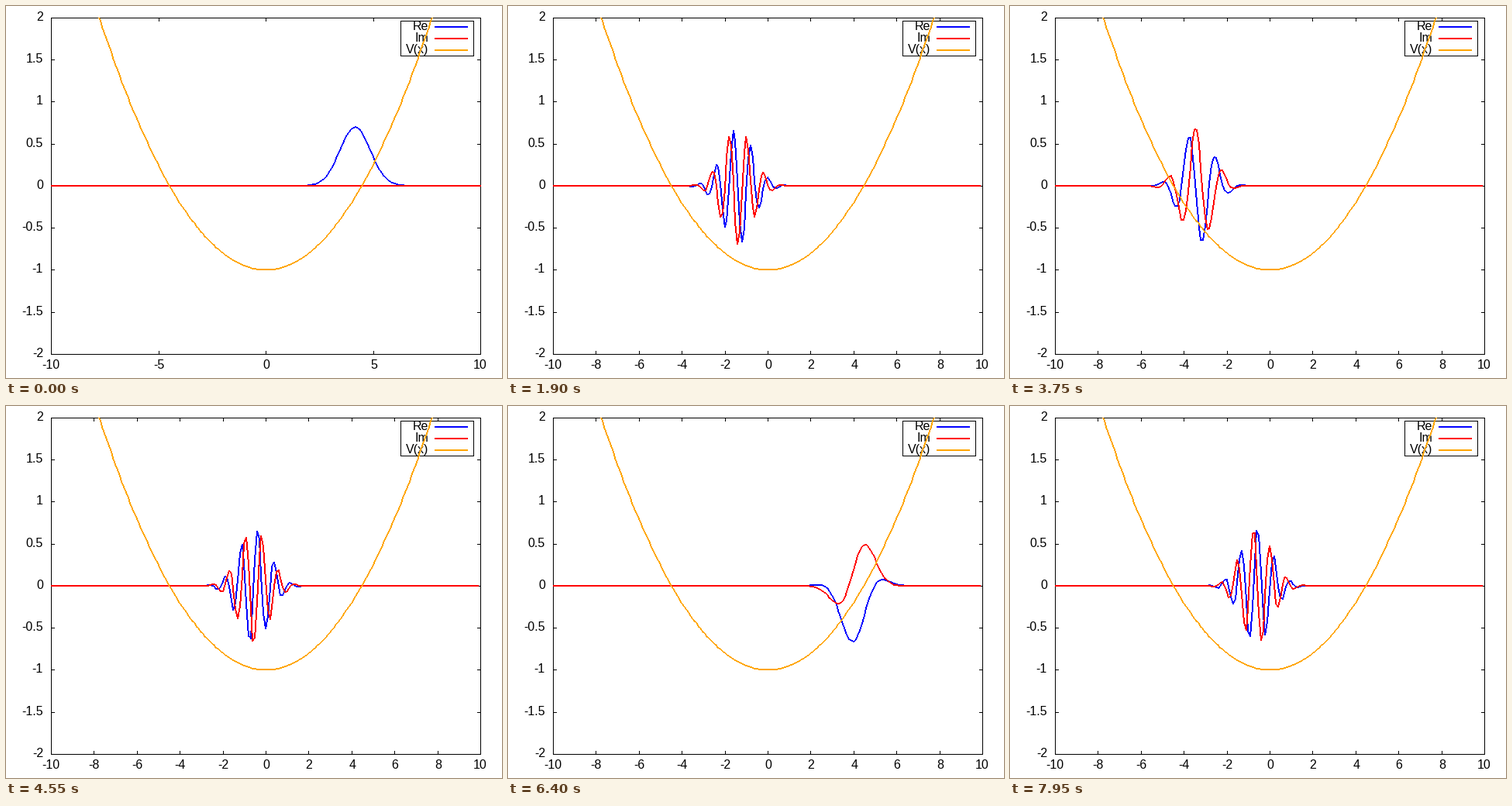
Write a matplotlib script that moves like this. It is 640 by 480 pixels and loops after 8000 ms.

```python
import matplotlib.pyplot as plt
import numpy as np
from matplotlib.animation import FuncAnimation

W, H, DPI = 640, 480, 100
LEFT, RIGHT, TOP, BOTTOM = 58, 612, 15, 449
PX = 72 / DPI                      # one pixel in points
FRAMES, INTERVAL = 160, 50
BLUE, RED, ORANGE = (0, 0, 255, 255), (255, 0, 0, 255), (255, 165, 0, 255)

# Coherent state in V(x) = x^2/20 - 1, with hbar = 1 and one time unit per frame
MASS = 4 * np.pi ** 2
OMEGA = np.sqrt(0.1 / MASS)
ALPHA = MASS * OMEGA
X0, AMP, V0 = 25 / 6, 0.697, -1.0

plt.rcParams["font.family"] = "Liberation Sans"

fig = plt.figure(figsize=(W / DPI, H / DPI), dpi=DPI, facecolor="white")
ax = fig.add_axes([0, 0, 1, 1])
ax.axis("off")


def to_px(x):
    return np.floor(335.5 + 27.7 * np.asarray(x)).astype(int)


def to_py(y):
    return 232 - np.floor(108.5 * np.asarray(y) + 0.5).astype(int)


def thin(xs, ys):
    """One-pixel black line through pixel centres."""
    return ax.plot(np.add(xs, 0.5), np.add(ys, 0.5), color="black", lw=PX,
                   antialiased=False, snap=False, zorder=1,
                   solid_capstyle="projecting", solid_joinstyle="miter")[0]


def frame_box(x0, y0, x1, y1):
    thin([x0, x1, x1, x0, x0], [y0, y0, y1, y1, y0])


def label(x, y, text, ha):
    return ax.text(x, y, text, ha=ha, va="baseline", fontsize=16 * PX,
                   color="black", zorder=2)


def x_ticks(step):
    """Bottom and top ticks with labels; returns the artists."""
    parts = []
    for v in range(-10, 11, step):
        p, text = to_px(v), str(v)
        parts.append(thin([p, p], [BOTTOM, BOTTOM - 4]))
        parts.append(thin([p, p], [TOP, TOP + 4]))
        parts.append(label(p + (len(text) == 1), 468, text, "center"))
    return parts


def stroke(img, xs, ys, color):
    """Crisp polyline, two pixels wide across its main direction."""
    pts = list(zip(xs, ys))
    for a, b in zip(pts, pts[1:]):
        steep = abs(b[1] - a[1]) > abs(b[0] - a[0])
        if a[steep] > b[steep]:
            a, b = b, a
        dx, dy = b[0] - a[0], b[1] - a[1]
        n = max(abs(dx), abs(dy))
        if n == 0:
            continue
        t = np.arange(n + 1) / n
        px = a[0] + np.sign(dx) * np.floor(abs(dx) * t + 0.5).astype(int)
        py = a[1] + np.sign(dy) * np.floor(abs(dy) * t + 0.5).astype(int)
        img[py, px] = color
        if steep:
            img[py, px - 1] = color
        else:
            img[py - 1, px] = color


def psi(x, n):
    th = OMEGA * n
    xc, pc = X0 * np.cos(th), -ALPHA * X0 * np.sin(th)
    phase = pc * (x - xc / 2) - th / 2 - V0 * n
    return AMP * np.exp(-ALPHA / 2 * (x - xc) ** 2 + 1j * phase)


# Axes
frame_box(LEFT, TOP, RIGHT, BOTTOM)
for v in np.arange(-2, 2.1, 0.5):
    p = to_py(v)
    thin([LEFT, LEFT + 4], [p, p])
    thin([RIGHT, RIGHT - 4], [p, p])
    label(48, p + 4, f"{v:g}", "right")
coarse, fine = x_ticks(5), x_ticks(2)

# Key and potential, kept as a fixed layer
still = np.zeros((H, W, 4), np.uint8)
frame_box(509, 19, 603, 64)
for i, (name, color) in enumerate((("Re", BLUE), ("Im", RED),
                                   ("V(x)", ORANGE))):
    y = 27 + 15 * i
    label(545, y + 4, name, "right")
    stroke(still, [553, 595], [y, y], color)

grid = np.linspace(-10, 10, 201)
edge = np.sqrt(60)
xv = np.unique(np.clip(grid, -edge, edge))
stroke(still, to_px(xv), to_py(xv ** 2 / 20 - 1), ORANGE)
solid = still[..., 3] > 0

layer = ax.imshow(still, extent=(0, W, H, 0), aspect="auto",
                  interpolation="none", zorder=3)
ax.set_xlim(0, W)
ax.set_ylim(H, 0)


def update(n):
    x = grid if n == 0 else grid[:-1]
    wave, px = psi(x, n), to_px(x)
    img = np.zeros_like(still)
    stroke(img, px, to_py(wave.real), BLUE)
    stroke(img, px, to_py(wave.imag), RED)
    img[solid] = still[solid]
    layer.set_data(img)
    for part in coarse:
        part.set_visible(n == 0)
    for part in fine:
        part.set_visible(n > 0)
    return [layer, *coarse, *fine]


anim = FuncAnimation(fig, update, frames=FRAMES, interval=INTERVAL,
                     init_func=lambda: update(0), repeat=True,
                     repeat_delay=0, blit=False)
plt.show()
```
